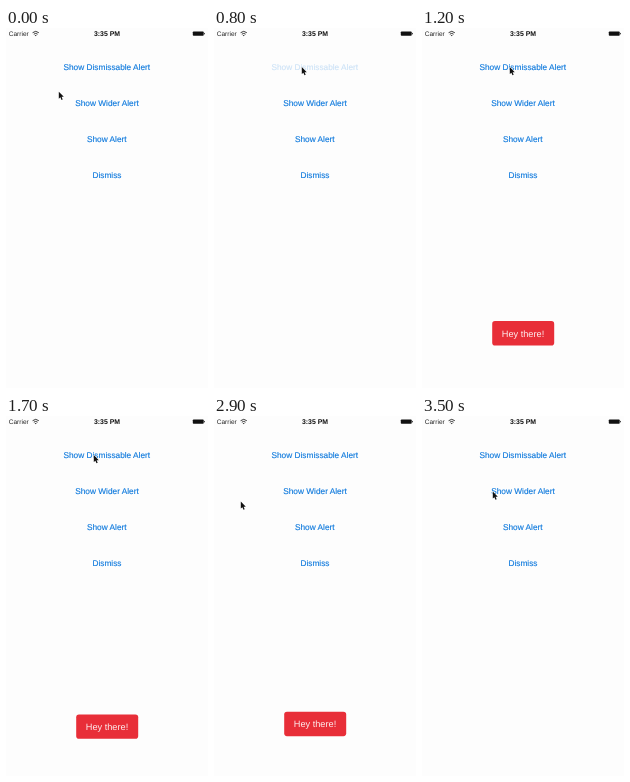
An HTML page for the animation above (3600 ms loop, 202x360 px).

```html
<!DOCTYPE html>
<html lang="en">
<head>
<meta charset="utf-8">
<title>Alert demo</title>
<style>
  html, body { margin: 0; width: 100%; height: 100%; overflow: hidden; background: #fdfdfd; }
  svg { display: block; width: 202px; height: 360px; }
  text {
    font-family: "Liberation Sans", Arial, sans-serif;
    text-anchor: middle;
    text-rendering: geometricPrecision;
  }
  .link { font-size: 8.3px; fill: #0876dc; stroke: #0876dc; stroke-width: .12; }
  .status { font-size: 6.5px; fill: #222; text-anchor: start; }
  .time { font-size: 6.9px; font-weight: bold; fill: #111; }
  .label { font-size: 9.2px; fill: #fff; fill-opacity: .92; }
</style>
</head>
<body>
<svg viewBox="0 0 202 360">
  <rect width="202" height="360" fill="#fdfdfd"/>

  <text class="status" x="2.8" y="8">Carrier</text>
  <g fill="none" stroke="#222" stroke-width=".9">
    <path d="M26.6 4.7Q29.7 2 32.8 4.7M27.8 6.2Q29.7 4.6 31.6 6.2"/>
    <path d="M28.7 7.1L29.7 8.2L30.7 7.1Z" fill="#222" stroke="none"/>
  </g>
  <text class="time" x="101" y="8">3:35 PM</text>
  <rect x="186.8" y="3.5" width="10.9" height="4.3" rx=".8" fill="#111"/>
  <rect x="198.2" y="4.8" width=".8" height="1.7" rx=".4" fill="#111"/>

  <text class="link" id="first" x="100.8" y="42">Show Dismissable Alert</text>
  <text class="link" x="101" y="77.8">Show Wider Alert</text>
  <text class="link" x="100.8" y="114">Show Alert</text>
  <text class="link" x="101" y="150">Dismiss</text>

  <g id="alert">
    <rect x="70.2" y="298.2" width="62" height="24.4" rx="2.8" fill="#e82e38"/>
    <text class="label" x="101" y="313.8">Hey there!</text>
  </g>

  <path id="cursor" d="M0 0V7L1.6 5.6L2.7 8.2L3.9 7.7L2.8 5.1H5Z"
        fill="#111" stroke="#fff" stroke-width=".9" stroke-linejoin="round" paint-order="stroke"/>
</svg>
<script>
const LOOP = 3600, STEP = 100;
const PRESS = 800, SHOW = 900, HIDE = 2800, TRAVEL = 60;
const $ = id => document.getElementById(id);
const first = $('first'), alertBox = $('alert'), cursor = $('cursor');

const progress = (t, from, to) => Math.min(1, Math.max(0, (t - from) / (to - from)));

function glide(t, from, to) {
  const p = progress(t, from, to);
  return p * p * (3 - 2 * p);
}

// Springs up, then leaves with a small hop before the drop
function popupOffset(t) {
  if (t < HIDE) {
    const s = Math.max(0, t - SHOW) / 1000;
    return TRAVEL * Math.exp(-7 * s) * Math.cos(7.8 * s);
  }
  const p = progress(t, HIDE, HIDE + 400), back = 1.2;
  return TRAVEL * p * p * ((back + 1) * p - back);
}

function render(t) {
  const toButton = glide(t, 0, 600), toNext = glide(t, 3000, 3500);
  const x = 52.8 + 35 * toButton - 61 * glide(t, 2200, 2700) + 44 * toNext;
  const y = 63.7 - 24.6 * toButton + 46.5 * glide(t, 2250, 2700) - 10 * toNext;
  cursor.setAttribute('transform', `translate(${x} ${y})`);

  const link = t < PRESS ? 1 : .2 + .8 * progress(t, PRESS, PRESS + 200);
  first.setAttribute('opacity', link);

  const alpha = progress(t, SHOW, SHOW + 200) - progress(t, HIDE + 200, HIDE + 400);
  alertBox.setAttribute('transform', `translate(0 ${popupOffset(t)})`);
  alertBox.setAttribute('opacity', alpha);
}

const start = performance.now();
function tick() {
  const t = (performance.now() - start) % LOOP;
  render(Math.floor(t / STEP) * STEP);
  requestAnimationFrame(tick);
}
tick();
</script>
</body>
</html>
```
